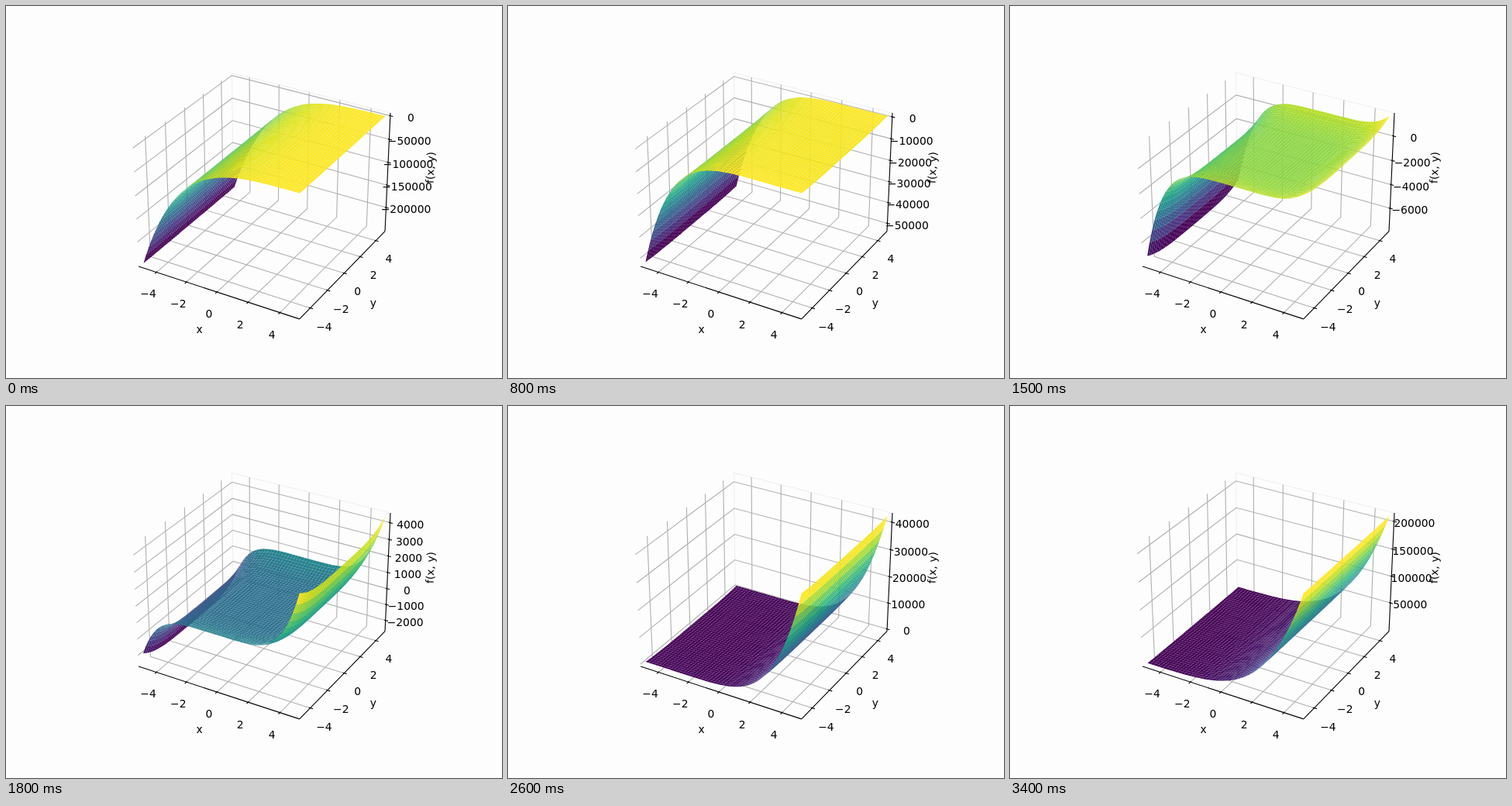
Write an HTML page that moves like this. It is 640x480 px and loops after 3.5 s.

```html
<!DOCTYPE html>
<html>
<head>
<meta charset="utf-8">
<style>
  html, body { margin: 0; width: 100%; height: 100%; overflow: hidden; background: #fdfdfd; }
  svg { display: block; width: 640px; height: 480px; }
  text { font: 13.89px "DejaVu Sans", sans-serif; text-anchor: middle; fill: #000; }
  path { fill: none; stroke-width: 1.11; }
  .pane { stroke: #efefef; }
  .grid { stroke: #b0b0b0; }
  .axis { stroke: #000; }
  #surface path { stroke: none; }
</style>
</head>
<body>
<svg viewBox="0 0 640 480">
  <g id="axes"></g>
  <g id="surface"></g>
</svg>
<script>
const FRAME_MS = 100, FRAMES = 35, SAMPLES = 50;
const EDGE = 25 / 48;                 // half the box, in units of the data range
const PER_POINT = 48 / 532.2 / 12;    // label offset per typographic point
const VIRIDIS = ('440154 481a6c 472f7d 414487 39568c 31688e 2a788e 23888e ' +
  '1f988b 22a884 35b779 54c568 7ad151 a5db36 d2e21b fde725').split(' ')
  .map(hex => [0, 2, 4].map(i => parseInt(hex.slice(i, i + 2), 16)));

const axesGroup = document.getElementById('axes');
const surfaceGroup = document.getElementById('surface');
const coords = Array.from({ length: SAMPLES }, (_, i) => -5 + 10 * i / (SAMPLES - 1));
const height = (x, y, shift) => (x + shift) ** 5 + y ** 4;

// Perspective view, azimuth -60, elevation 30; inputs run from -0.5 to 0.5.
const COS = Math.sqrt(3) / 2;
function project([x, y, z]) {
  x *= 8 / 7; y *= 8 / 7; z *= 6 / 7;
  const depth = 10 - (COS / 2 * x - 0.75 * y + 0.5 * z);
  const scale = 1997.84 / depth;
  return [
    333 + scale * (COS * x + 0.5 * y),
    237.4 - scale * (-0.25 * x + COS / 2 * y + COS * z),
    depth
  ];
}

const point = p => p[0].toFixed(2) + ' ' + p[1].toFixed(2);
const line = (...pts) => 'M' + pts.map(p => point(project(p))).join('L');
const path = (cls, d) => `<path class="${cls}" d="${d}"/>`;
const label = (x, y, s) => `<text x="${x.toFixed(1)}" y="${Math.round(y)}">${s}</text>`;

function color(t) {
  const pos = Math.min(1, Math.max(0, t)) * (VIRIDIS.length - 1);
  const i = Math.min(VIRIDIS.length - 2, Math.floor(pos));
  return 'rgb(' + VIRIDIS[i].map((c, k) =>
    Math.round(c + (VIRIDIS[i + 1][k] - c) * (pos - i))) + ')';
}

function tickValues(min, max) {
  const raw = (max - min) / 8;
  const unit = 10 ** Math.floor(Math.log10(raw));
  const step = [1, 2, 2.5, 5, 10].map(s => s * unit).find(s => s >= raw);
  const ticks = [];
  for (let k = Math.ceil(min / step); k * step <= max; k++) ticks.push(k * step);
  return ticks;
}

// Each axis gives its position at t, pushed off the box by d, and its grid line.
const E = EDGE;
const AXES = [
  { at: (t, d) => [t, -E - d, -E - d], tick: (t, d) => [t, -E - d, -E],
    grid: t => [[t, -E, -E], [t, E, -E], [t, E, E]], name: 'x' },
  { at: (t, d) => [E + d, t, -E - d], tick: (t, d) => [E + d, t, -E],
    grid: t => [[E, t, -E], [-E, t, -E], [-E, t, E]], name: 'y' },
  { at: (t, d) => [E + d, E + d, t], tick: (t, d) => [E + d, E, t],
    grid: t => [[-E, -E, t], [-E, E, t], [E, E, t]], name: 'f(x, y)' }
];

function drawAxis(axis, min, max) {
  let grid = '', marks = line(axis.at(-E, 0), axis.at(E, 0)), texts = '';
  for (const value of tickValues(min, max)) {
    const t = (value - min) / (max - min) - 0.5;
    grid += line(...axis.grid(t));
    marks += line(axis.tick(t, 0.2 / 12), axis.tick(t, -0.1 / 12));
    const [x, y] = project(axis.at(t, 11.5 * PER_POINT));
    texts += label(x, y + 10.7, String(value).replace('-', '\u2212'));
  }
  const [x, y] = project(axis.at(0, 25 * PER_POINT));
  texts += axis.name.length > 1
    ? `<text transform="translate(${x} ${y}) rotate(-87.4)" y="3.9">${axis.name}</text>`
    : label(x, y + 3.9, axis.name);
  return path('grid', grid) + path('axis', marks) + texts;
}

function drawAxes(zMin, zMax) {
  axesGroup.innerHTML =
    path('pane', line([-E, E, -E], [-E, E, E], [E, E, E])) +
    AXES.map((axis, i) => i < 2 ? drawAxis(axis, -5, 5) : drawAxis(axis, zMin, zMax)).join('');
}

const cells = Array.from({ length: (SAMPLES - 1) ** 2 }, () =>
  surfaceGroup.appendChild(document.createElementNS('http://www.w3.org/2000/svg', 'path')));

function drawFrame(frame) {
  const shift = -7 + 0.4 * frame;
  const z = coords.map(x => coords.map(y => height(x, y, shift)));
  const zMin = Math.min(...z.flat()), zMax = Math.max(...z.flat());
  const pts = z.map((row, i) => row.map((v, j) =>
    project([coords[i] / 10, coords[j] / 10, (v - zMin) / (zMax - zMin) - 0.5])));

  const quads = [];
  for (let i = 0; i < SAMPLES - 1; i++) {
    for (let j = 0; j < SAMPLES - 1; j++) {
      const corners = [[i, j], [i + 1, j], [i + 1, j + 1], [i, j + 1]];
      quads.push({
        pts: corners.map(([a, b]) => pts[a][b]),
        mean: corners.reduce((sum, [a, b]) => sum + z[a][b], 0) / 4,
        depth: corners.reduce((sum, [a, b]) => sum + pts[a][b][2], 0)
      });
    }
  }
  const means = quads.map(q => q.mean);
  const low = Math.min(...means), high = Math.max(...means);
  quads.sort((a, b) => b.depth - a.depth);

  drawAxes(zMin, zMax);
  quads.forEach((q, k) => {
    cells[k].setAttribute('d', 'M' + q.pts.map(point).join('L') + 'Z');
    cells[k].style.fill = color((q.mean - low) / (high - low));
  });
}

const start = performance.now();
let shown = -1;
function update() {
  const frame = Math.floor((performance.now() - start) / FRAME_MS) % FRAMES;
  if (frame !== shown) drawFrame(shown = frame);
  requestAnimationFrame(update);
}
update();
</script>
</body>
</html>
```
